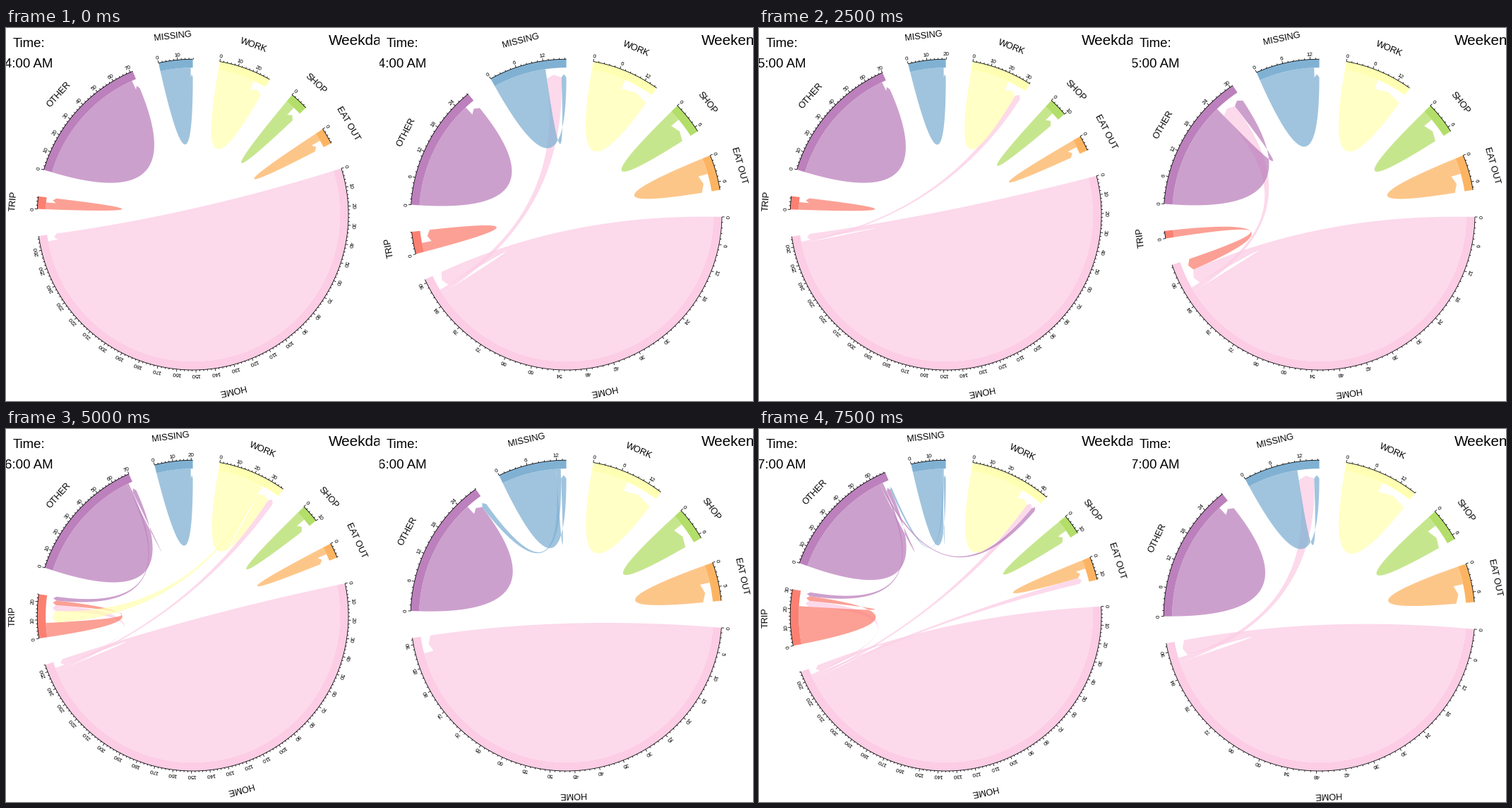
Write a matplotlib script that moves like this. It is 1058 px wide and 529 px high and loops after 8 s.

```python
import numpy as np
import matplotlib.pyplot as plt
from matplotlib.animation import FuncAnimation
from matplotlib.collections import LineCollection
from matplotlib.patches import Polygon

W, H, DPI = 1058, 529, 100
HALF = W / 2
PT = 72 / DPI
FONT = "Liberation Sans"

# radii in pixels: ring, link start, arrow tip, arrow shoulder
R_OUT, R_IN, R_TIP, R_BASE = 220.4, 208.4, 199.2, 194.6
R_NUM, R_NAME = 225.4, 251.6
GAP = 10

# sectors in clockwise order, Work starting 10 degrees past the top
NAMES = dict(W="WORK", S="SHOP", E="EAT OUT", H="HOME",
             T="TRIP", O="OTHER", M="MISSING")
ORDER = "WSEHTOM"
DRAW_ORDER = "EHMOSTW"
COLORS = dict(W="#FFFFB3", S="#B3DE69", E="#FDB462", H="#FCCDE5",
              T="#FB8072", O="#BC80BD", M="#80B1D3")
# width of a link at its arrow end, set by the sector it leaves
HEAD = dict(W=7.0, S=4.6, E=4.1, H=3.6, T=2.8, O=2.4, M=1.2)

TIMES = ["4:00 AM", "4:30 AM", "5:00 AM", "5:30 AM",
         "6:00 AM", "6:30 AM", "7:00 AM"]

# sector totals in ORDER, then the links between different sectors
WEEKDAY = [
    ((27.7, 9.9, 8.6, 267.6, 6.6, 71.4, 18.0), ""),
    ((32.0, 9.9, 8.3, 267.0, 6.1, 70.2, 20.0), "HW"),
    ((32.4, 10.0, 8.3, 265.7, 7.0, 70.1, 20.0), "HW"),
    ((33.2, 10.0, 8.5, 263.5, 12.1, 68.6, 23.7), "HW HT HM"),
    ((37.4, 10.0, 8.3, 254.0, 24.0, 70.0, 20.9), "HW HT OT WT"),
    ((40.4, 10.4, 8.3, 247.0, 21.2, 73.0, 25.0), "HW HT HO HM MS"),
    ((44.1, 11.1, 12.7, 236.0, 30.5, 68.9, 18.8), "HW HE HT MO OW OT"),
]
WEEKEND = [
    ((15.0, 7.1, 7.8, 90.8, 4.9, 27.8, 17.1), "HM"),
    ((14.9, 7.2, 7.9, 91.2, 4.8, 26.7, 14.3), ""),
    ((15.0, 7.1, 7.8, 94.2, 1.65, 30.7, 14.0), "HO TH"),
    ((15.1, 6.9, 7.9, 92.0, 0, 27.9, 14.0), ""),
    ((15.0, 6.9, 7.9, 91.4, 0, 28.8, 14.0), "MO"),
    ((19.2, 6.9, 8.0, 91.1, 0, 29.1, 12.05), "HW"),
    ((15.6, 7.0, 8.1, 91.9, 0, 28.9, 15.9), "HM"),
]


def polar(r, deg):
    a = np.radians(deg)
    return np.column_stack([r * np.cos(a), r * np.sin(a)])


def arc(r, a, b):
    return polar(r, np.linspace(a, b, max(3, int(abs(b - a)) + 2)))


def curve(p, q):
    """Quadratic curve from p to q, pulled to the centre of the circle."""
    t = np.linspace(0, 1, 60)[:, None]
    return (1 - t) ** 2 * p + t ** 2 * q


def link_shape(src, dst):
    """Ribbon from the arc src to a broad arrow head on the arc dst."""
    (a0, a1), (b0, b1) = src, dst
    foot = arc(R_IN, a1, a0)
    left, right = polar(R_BASE, np.array([b0, b1]))
    tip = polar(R_TIP, np.array([(b0 + b1) / 2]))
    return np.vstack([foot, curve(foot[-1], right), tip,
                      curve(left, foot[0])])


def layout(totals):
    """Start angle of every present sector and the degrees per unit."""
    present = [(k, v) for k, v in zip(ORDER, totals) if v > 0]
    unit = (360 - GAP * len(present)) / sum(v for _, v in present)
    start, angle = {}, 90 - GAP
    for k, v in present:
        start[k] = angle
        angle -= v * unit + GAP
    return dict(present), start, unit


def slots(size, flows):
    """Unit ranges taken by link starts and link heads in each sector."""
    tails, heads = {}, {}
    for k, total in size.items():
        outs = [d for d in ORDER if k + d in flows]
        has_self = total > HEAD[k]
        ins = [s for s in ORDER if s + k in flows or (s == k and has_self)]
        room = total - sum(HEAD[s] for s in ins)
        thin = 1.0 if has_self else room / max(1, len(outs))
        x = 0
        if has_self:
            x = room - thin * len(outs)
            tails[k + k] = (0, x)
        for d in outs:
            tails[k + d] = (x, x + thin)
            x += thin
        for s in ins:
            heads[s + k] = (x, x + HEAD[s])
            x += HEAD[s]
    return tails, heads


def label(ax, r, deg, text, px):
    x, y = polar(r, np.array([deg]))[0]
    return ax.text(x, y, text, rotation=deg - 90, rotation_mode="anchor",
                   ha="center", va="baseline", family=FONT,
                   fontsize=px * PT, color="black", clip_on=True, zorder=5)


def draw_axis(ax, start, total, unit, step):
    items, ticks = [], []
    end = start - total * unit
    for i in range(int(total / step * 5 + 0.01) + 1):
        deg = start - i * step / 5 * unit
        major = i % 5 == 0
        length = 3.6 if major else 2.0
        ticks.append(polar(np.array([R_OUT, R_OUT + length]), deg))
        if major:
            items.append(label(ax, R_NUM, deg, str(i // 5 * step), 8))
    lines = [arc(R_OUT, start, end)] + ticks
    items.append(ax.add_collection(
        LineCollection(lines, colors="black", linewidths=0.8 * PT, zorder=4)))
    return items


def draw_chart(ax, totals, flows, step_of):
    size, start, unit = layout(totals)
    flows = flows.split()
    tails, heads = slots(size, flows)
    items = []

    for k, total in size.items():
        a, b = start[k], start[k] - total * unit
        ring = np.vstack([arc(R_OUT, a, b), arc(R_IN, b, a)])
        items.append(ax.add_patch(
            Polygon(ring, facecolor=COLORS[k], edgecolor="none", zorder=1)))
        items += draw_axis(ax, a, total, unit, step_of(k))
        items.append(label(ax, R_NAME, (a + b) / 2, NAMES[k], 12.8))

    def span(k, rng):
        return [start[k] - v * unit for v in rng]

    for key in sorted(tails, key=lambda f: (DRAW_ORDER.index(f[0]),
                                            f[0] != f[1])):
        s, d = key
        shape = link_shape(span(s, tails[key]), span(d, heads[key]))
        items.append(ax.add_patch(
            Polygon(shape, facecolor=COLORS[s], alpha=0.75,
                    edgecolor="none", zorder=2)))
    return items


def make_panel(fig, side, title):
    ax = fig.add_axes([side * 0.5, 0, 0.5, 1])
    ax.set_xlim(-264.6, HALF - 264.6)
    ax.set_ylim(264.6 - H, 264.6)
    ax.axis("off")
    put(ax, 32, 27, "Time:", 18.6, "center")
    put(ax, 457 - side, 24.5, title, 20.6, "left")
    return ax


def put(ax, x, y, text, px, ha):
    return ax.text(x - 264.6, 264.6 - y, text, ha=ha, va="baseline",
                   family=FONT, fontsize=px * PT, color="black",
                   clip_on=True)


def weekend_step(n):
    if n == 3:
        return lambda k: 5
    if n == 4:
        return lambda k: 5 if k in "EH" else 6
    return lambda k: 6


fig = plt.figure(figsize=(W / DPI, H / DPI), dpi=DPI, facecolor="white")
day = make_panel(fig, 0, "Weekdays")
end = make_panel(fig, 1, "Weekends")

scenes = []
for n, clock in enumerate(TIMES):
    scene = draw_chart(day, *WEEKDAY[n], lambda k: 10)
    scene += draw_chart(end, *WEEKEND[n], weekend_step(n))
    scene += [put(ax, 32, 56, clock, 18.6, "center") for ax in (day, end)]
    scenes.append(scene)

INTERVAL, HOLD, LOOP = 250, 1250, 8000


def update(i):
    now = i * INTERVAL // HOLD
    for n, scene in enumerate(scenes):
        for item in scene:
            item.set_visible(n == now)
    return []


anim = FuncAnimation(fig, update, frames=LOOP // INTERVAL, interval=INTERVAL,
                     init_func=lambda: update(0), repeat=True, blit=False)
plt.show()
```
